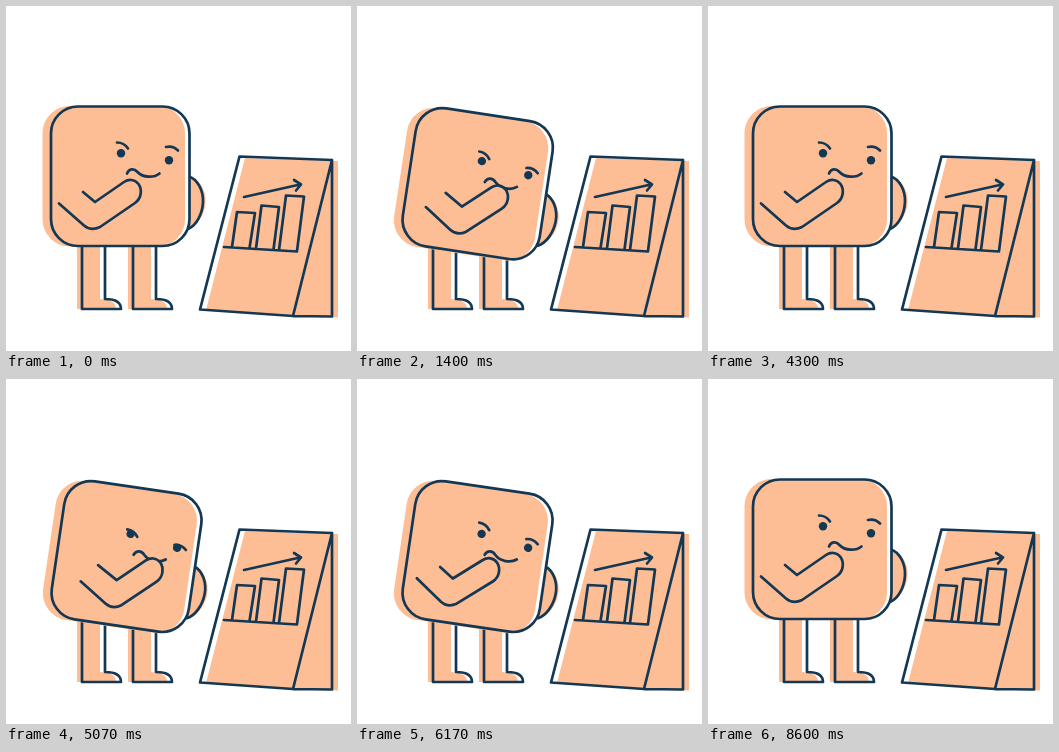
These frames come from a looping animation (345 px wide and 345 px high, 8.66 s). An HTML page:

```html
<!DOCTYPE html>
<html lang="en">
<head>
<meta charset="utf-8">
<title>Thinking it over</title>
<style>
  html, body { margin: 0; width: 100%; height: 100%; overflow: hidden; background: #fff; }
  svg { display: block; width: 100%; height: 100%; }
  .line { fill: none; stroke: #143854; stroke-width: 2.7; stroke-linecap: round; stroke-linejoin: round; }
  .tint, .line.tint { fill: #fdbe95; }
  .ink { fill: #143854; }
</style>
</head>
<body>
<svg viewBox="0 0 345 345">
  <defs>
    <path id="leg" d="M76 225V303H115C115 296 109 293 99 293V225Z"/>
  </defs>

  <g id="board">
    <path class="tint" d="M239 152L332 155V311.5L287 310.5L200 304Z"/>
    <path class="line" d="M233.5 150.5L326 154V310.5L287 310L194 303.5ZM326 154L287 310"/>
    <path class="line" d="M218 241L291 245.5M226 241L231 206L249 207L243.5 242M250 242.5L255.5 199.5L273 201L267.5 243.5M273 244L280 189.5L298 190.5L291 245"/>
    <path class="line" d="M238 191L294 178.5M288 174L295 178.5L290 184.5"/>
  </g>

  <g id="legs">
    <use href="#leg" class="tint" x="-5"/>
    <use href="#leg" class="tint" x="46"/>
    <use href="#leg" class="line"/>
    <use href="#leg" class="line" x="51"/>
  </g>

  <g id="body">
    <path class="tint" d="M180 170C192 171 200 183 199.5 196C199 209 191 221 180 224Z"/>
    <path class="line" d="M183 170.5C191 173 197.500 184 197 196C196.500 208 190.500 219 183 222.5"/>
    <rect x="45" y="100.5" width="138.5" height="139.5" rx="27" fill="#fff"/>
    <rect class="tint" id="shade" x="36.5" y="100" width="142.5" height="140.5" rx="27"/>
    <rect class="line" x="45" y="100.5" width="138.5" height="139.5" rx="27"/>
    <circle class="ink" cx="115" cy="147.3" r="4.2"/>
    <circle class="ink" cx="163" cy="154.3" r="4.2"/>
    <path class="line" id="leftBrow" d="M111 136.5Q118 136.5 122 142.5"/>
    <path class="line" id="rightBrow" d="M160 141Q167 139.5 172 144.5"/>
    <path class="line" d="M121 167.5C123 162.5 128 162 131.5 166C137 172 148 172 153.5 167.5"/>
  </g>

  <path class="line tint" id="arm"/>
</svg>
<script>
  const CYCLE = 4330;
  const [body, shade, leftBrow, rightBrow, arm] =
    ['body', 'shade', 'leftBrow', 'rightBrow', 'arm'].map(id => document.getElementById(id));

  const ease = (t, from, to) => {
    const p = Math.min(1, Math.max(0, (t - from) / (to - from)));
    return p * p * (3 - 2 * p);
  };
  // Rises to 1 between a and b, falls back to 0 between c and d.
  const swing = (t, a, b, c, d) => ease(t, a, b) - ease(t, c, d);

  const move = (node, x, y, angle = 0, cx = 0, cy = 0) =>
    node.setAttribute('transform', `translate(${x} ${y}) rotate(${angle} ${cx} ${cy})`);

  function draw(t) {
    const lean = swing(t, 20, 820, 1780, 2400);
    const stroke = swing(t, 20, 840, 870, 2200);
    const frown = swing(t, 20, 820, 870, 1650);

    move(body, 6.5 * lean, 7.5 * lean, 8.6 * lean, 114.5, 170);
    move(shade, 0, 1.4 * lean);
    move(leftBrow, 0, 7 * frown);
    move(rightBrow, 0, 5 * lean + 6 * frown);

    // The forearm's inner line lengthens as the hand slides forward.
    arm.setAttribute('d', 'M53 197.5L78 219.5Q85 225.5 94 221L129 197' +
      'C136 192 136 183 132.5 178C128.5 173 122.5 173 118 176L89 196' +
      `L${77 - 7 * stroke} ${186 - 5 * stroke}`);
    move(arm, 3.5 * lean + 19 * stroke, lean + 4 * stroke, 3.5 * lean - 3 * stroke, 53, 197.5);
  }

  const start = performance.now();
  function tick() {
    draw((performance.now() - start) % CYCLE);
    requestAnimationFrame(tick);
  }
  tick();
</script>
</body>
</html>
```
